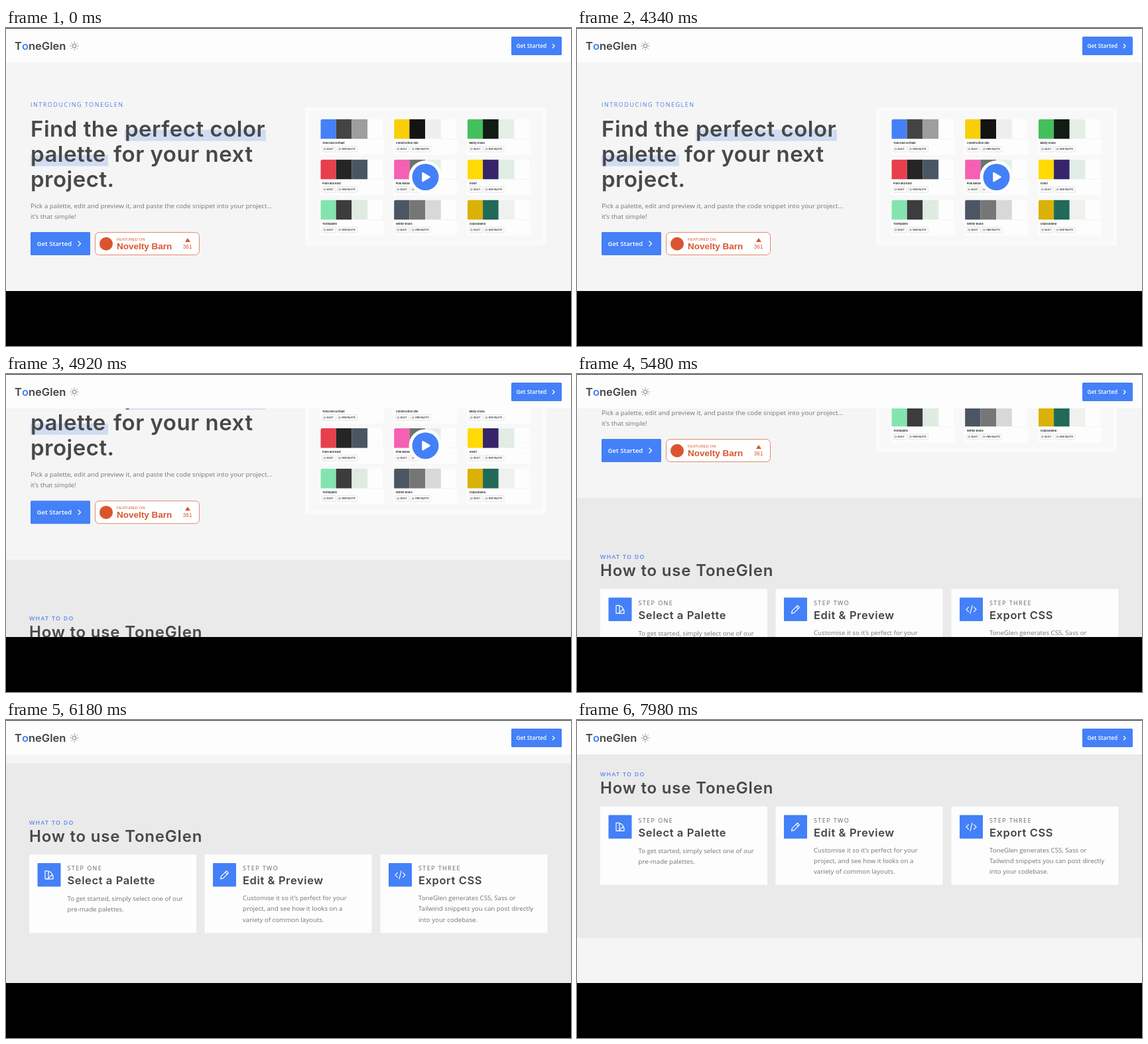
Write an HTML page with a canvas that moves like this. It is 852 px wide and 480 px high and loops after 8 s.

```html
<!DOCTYPE html>
<html lang="en">
<head>
<meta charset="utf-8">
<title>ToneGlen</title>
<style>
  html, body { margin: 0; width: 852px; height: 480px; overflow: hidden; background: #000; }
  canvas { display: block; }
</style>
</head>
<body>
<canvas id="stage" width="852" height="480"></canvas>
<script>
const ctx = document.getElementById('stage').getContext('2d');
const LOOP = 8000;
const VIEW_BOTTOM = 397;
const HEADER_BOTTOM = 52;

const BLUE = '#4480f7';
const ORANGE = '#da552f';
const LIGHT = '#f5f5f5';
const GREY = '#eaeaea';
const WHITE = '#fdfdfd';
const INK = '#484848';
const DARK = '#444444';
const BODY = '#747474';

const HEAD = 'Inter, sans-serif';
const SANS = '"Open Sans", sans-serif';
const ARIAL = '"Liberation Sans", Arial, sans-serif';

// [step, scroll offset in px]; see stepAt for the stepping
const SCROLL = [
  [0, 0], [94, 0], [100, 78], [117, 210], [132, 331.5], [146, 444], [165, 444], [170, 404], [172, 388]
];

const PALETTES = [
  ['ToneGlen Default', BLUE, '#444444', '#9e9e9e'],
  ['Construction Site', '#f8cf06', '#131313', '#eeeeee'],
  ['Misty Grass', '#43c05c', '#111c14', '#e5efe6'],
  ['Plum and Rust', '#e83f4d', '#252525', '#4b5663'],
  ['Pink Modern', '#f560b3', '#6f7171', '#e4efe8'],
  ['Violet', '#ffda04', '#36256a', '#e2ede6'],
  ['Toothpaste', '#84e4b0', '#3c3c3c', '#dfebe1'],
  ['Winter Blues', '#4c5663', '#767676', '#d8d8d8'],
  ['Copacabana', '#dab106', '#206a5a', '#eff1ec']
];

const STEPS = [
  { x: 35, label: 'STEP ONE', title: 'Select a Palette', icon: swatchIcon, top: 604.5,
    lines: ['To get started, simply select one of our', 'pre-made palettes.'] },
  { x: 299.5, label: 'STEP TWO', title: 'Edit & Preview', icon: pencilIcon, top: 603.5,
    lines: ['Customise it so it’s perfect for your', 'project, and see how it looks on a', 'variety of common layouts.'] },
  { x: 564.5, label: 'STEP THREE', title: 'Export CSS', icon: codeIcon, top: 603.5,
    lines: ['ToneGlen generates CSS, Sass or', 'Tailwind snippets you can post directly', 'into your codebase.'] }
];

function rect(x, y, w, h, fill, radius = 0, stroke) {
  ctx.beginPath();
  ctx.roundRect(x, y, w, h, radius);
  ctx.fillStyle = fill;
  ctx.fill();
  if (stroke) {
    ctx.strokeStyle = stroke;
    ctx.lineWidth = 1;
    ctx.stroke();
  }
}

function circle(x, y, r, fill) {
  ctx.beginPath();
  ctx.arc(x, y, r, 0, Math.PI * 2);
  ctx.fillStyle = fill;
  ctx.fill();
}

function ring(x, y, r, color, width) {
  ctx.beginPath();
  ctx.arc(x, y, r, 0, Math.PI * 2);
  ctx.strokeStyle = color;
  ctx.lineWidth = width;
  ctx.stroke();
}

function line(points, color, width = 1.2, close = false) {
  ctx.beginPath();
  points.forEach(([x, y]) => ctx.lineTo(x, y));
  if (close) ctx.closePath();
  ctx.strokeStyle = color;
  ctx.lineWidth = width;
  ctx.lineCap = ctx.lineJoin = 'round';
  ctx.stroke();
}

function triangle(points, fill) {
  ctx.beginPath();
  points.forEach(([x, y]) => ctx.lineTo(x, y));
  ctx.closePath();
  ctx.fillStyle = fill;
  ctx.fill();
}

function text(str, x, y, font, fill, spacing = 0) {
  ctx.font = font;
  ctx.letterSpacing = spacing + 'px';
  ctx.fillStyle = fill;
  ctx.fillText(str, x, y);
  return x + ctx.measureText(str).width;
}

function chevron(x, y, s) {
  line([[x, y - s], [x + s, y], [x, y + s]], '#fff', 1.3);
}

function swatchIcon(x, y) {
  line([[x - 6, y - 6], [x - 1, y - 6], [x - 1, y + 6], [x - 6, y + 6]], '#fff', 1.2, true);
  line([[x - 1, y - 4], [x + 1.5, y - 5], [x + 5, y - 1], [x - 1, y + 5]], '#fff');
  line([[x + 3, y + 1], [x + 6, y + 1], [x + 6, y + 6], [x - 4, y + 6]], '#fff');
}

function pencilIcon(x, y) {
  line([[x - 6, y + 6], [x - 5, y + 2], [x + 3, y - 6], [x + 6, y - 3], [x - 2, y + 5]], '#fff', 1.2, true);
  line([[x + 1, y - 4], [x + 4, y - 1]], '#fff');
}

function codeIcon(x, y) {
  line([[x - 4, y - 3.5], [x - 7.5, y], [x - 4, y + 3.5]], '#fff');
  line([[x + 4, y - 3.5], [x + 7.5, y], [x + 4, y + 3.5]], '#fff');
  line([[x + 1.5, y - 6], [x - 1.5, y + 6]], '#fff');
}

function header() {
  rect(0, 0, 852, HEADER_BOTTOM, WHITE);
  rect(0, 0, 852, 1, '#333');
  const font = '600 16.5px ' + HEAD;
  let x = text('T', 13, 32.5, font, DARK);
  x = text('o', x, 32.5, font, BLUE);
  text('neGlen', x, 32.5, font, DARK);

  ring(103, 27, 2.8, '#777', 1);
  for (let i = 0; i < 8; i++) {
    const c = Math.cos(i * Math.PI / 4), s = Math.sin(i * Math.PI / 4);
    line([[103 + c * 4.8, 27 + s * 4.8], [103 + c * 6, 27 + s * 6]], '#777', 1);
  }

  rect(762, 13, 76, 28, BLUE, 1.5);
  text('Get Started', 769.5, 30.3, '600 8.3px ' + SANS, '#fff');
  chevron(824.3, 27.2, 2.8);
}

function paletteCard(i) {
  const [name, ...colors] = PALETTES[i];
  const x = 474 + (i % 3) * 110.7;
  const y = 137.5 + Math.floor(i / 3) * 61;
  rect(x - 0.5, y, 96.5, 54, WHITE, 3);
  ctx.save();
  ctx.beginPath();
  ctx.roundRect(x + 0.5, y, 94.5, 30, [3, 3, 0, 0]);
  ctx.clip();
  colors.forEach((c, n) => rect(x + n * 23.7, y, 23.7, 30, c));
  ctx.restore();
  line([[x + 71, y + 30], [x + 95, y + 30], [x + 95, y + 1]], '#ececec', 0.6);
  text(name, x + 3, y + 37.3, '700 4px ' + HEAD, '#333');
  [[3, 20, 'SELECT'], [25.5, 30, 'VIEW PALETTE']].forEach(([dx, w, label]) => {
    rect(x + dx, y + 41, w, 8.5, WHITE, 1.5, '#e4e4e4');
    ring(x + dx + 3.5, y + 45.2, 1.3, '#555', 0.6);
    text(label, x + dx + 6.5, y + 46.5, '700 3px ' + SANS, '#444');
  });
}

function preview() {
  rect(451, 120, 363, 208, '#fbfbfb', 2);
  rect(456.5, 125.5, 352, 197, '#f8f8f8');
  PALETTES.forEach((_, i) => paletteCard(i));
  circle(632.5, 225, 25, WHITE);
  circle(632.5, 225, 20, BLUE);
  const arrow = [[628.5, 219], [638.5, 225], [628.5, 231]];
  triangle(arrow, '#fff');
  line(arrow, '#fff', 2.5, true);
}

function hero() {
  rect(0, 0, 852, 397, LIGHT);
  text('INTRODUCING TONEGLEN', 37, 118.8, '9px ' + SANS, '#4f7fea', 1.5);

  const marker = '#cfdcf3';
  rect(179, 153.5, 213, 17, marker);
  rect(37, 191.5, 117, 17, marker);
  const title = '600 33px ' + HEAD;
  text('Find the', 37, 164, title, INK, 0.5);
  text('perfect color', 179, 164, title, INK, 0.5);
  text('palette', 37, 202, title, INK, 0.5);
  text('for your next', 162, 202, title, INK, 0.5);
  text('project.', 37, 240, title, INK, 0.5);

  const body = '9.8px ' + SANS;
  text('Pick a palette, edit and preview it, and paste the code snippet into your project...', 37, 271.8, body, BODY);
  text('it’s that simple!', 37, 288.2, body, BODY);

  rect(37, 308, 90, 35, BLUE, 1.5);
  text('Get Started', 46.5, 329, '600 9.6px ' + SANS, '#fff');
  chevron(109, 325.5, 3.5);

  rect(134.5, 308.5, 157, 34, '#fff', 6, '#e08a6d');
  circle(151, 325.7, 10, ORANGE);
  text('FEATURED ON', 167, 321, '6px ' + ARIAL, ORANGE);
  text('Novelty Barn', 167, 333.6, '700 13.5px ' + ARIAL, ORANGE);
  triangle([[270, 323], [274, 317], [278, 323]], ORANGE);
  text('361', 266.8, 333.3, '8.2px ' + ARIAL, ORANGE);

  preview();
}

function stepCard({ x, label, title, icon, lines, top }) {
  rect(x, 534.5, 252, 118.5, WHITE, 1.5);
  rect(x + 12.5, 547.5, 35, 35.5, BLUE, 1);
  icon(x + 30, 565.3);
  text(label, x + 57.5, 558.8, '9px ' + SANS, '#666', 1.4);
  text(title, x + 57.5, 579.5, '600 16.5px ' + HEAD, DARK, 0.6);
  lines.forEach((s, i) => text(s, x + 57.5, top + i * 16.4, '9.7px ' + SANS, BODY));
}

function howTo() {
  rect(0, 397, 852, 336, GREY);
  text('WHAT TO DO', 35, 489, '600 8.8px ' + SANS, '#5c86ee', 1.3);
  text('How to use ToneGlen', 35, 515.3, '600 24px ' + HEAD, INK, 0.8);
  STEPS.forEach(stepCard);
}

// The page moves in an uneven beat: three steps per 140 ms, held 100, 20 and 20 ms.
function stepAt(t) {
  const u = Math.max(0, t - 20);
  const beat = u % 140;
  return Math.floor(u / 140) * 3 + (beat >= 100) + (beat >= 120);
}

function scrollAt(step) {
  const next = SCROLL.findIndex(([s]) => s > step);
  const [s0, y0] = SCROLL[next - 1], [s1, y1] = SCROLL[next];
  return y0 + (y1 - y0) * (step - s0) / (s1 - s0);
}

function draw(t) {
  ctx.fillStyle = '#000';
  ctx.fillRect(0, 0, 852, 480);
  ctx.save();
  ctx.beginPath();
  ctx.rect(0, 0, 852, VIEW_BOTTOM);
  ctx.clip();
  rect(0, 0, 852, VIEW_BOTTOM, LIGHT);
  ctx.translate(0, -scrollAt(stepAt(t)));
  hero();
  howTo();
  ctx.restore();
  header();
}

const start = performance.now();
function tick() {
  draw((performance.now() - start) % LOOP);
  requestAnimationFrame(tick);
}
tick();
</script>
</body>
</html>
```
